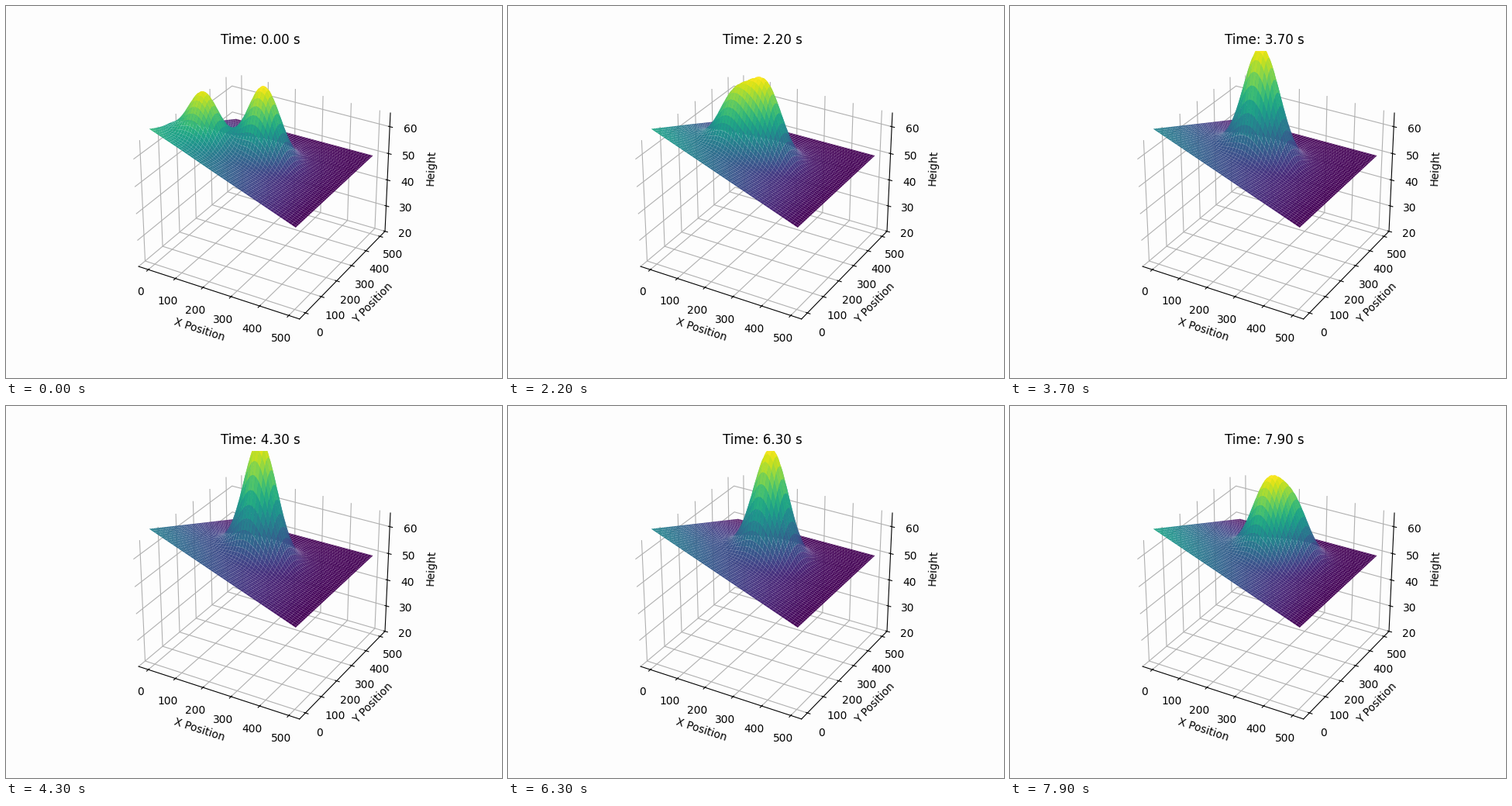
These frames come from a looping animation (640x480 px, 8 s). A matplotlib script:

```python
import numpy as np
import matplotlib.pyplot as plt
from matplotlib.animation import FuncAnimation

FRAMES, STEP = 80, 0.1

x = y = np.linspace(0, 500, 100)
X, Y = np.meshgrid(x, y)


def hill(cx, cy, height, sigma):
    return height * np.exp(-((X - cx) ** 2 + (Y - cy) ** 2) / (2 * sigma ** 2))


BASE = 50 + 20 * (1 - X / 500) * (1 - Y / 500)
GROUND = BASE + hill(250, 250, 25, 50)


def center(t):
    """Position of the travelling hill."""
    return 100 + 30.4 * t - 0.644 * t ** 2, 150 + 26.5 * t - 0.56 * t ** 2


fig = plt.figure(figsize=(6.4, 4.8), dpi=100, facecolor="#fdfdfd")
ax = fig.add_subplot(projection="3d", facecolor="#fdfdfd")
for axis in (ax.xaxis, ax.yaxis, ax.zaxis):
    axis.set_pane_color("#fdfdfd")
surface = None


def update(i):
    global surface
    t = i * STEP
    if surface is not None:
        surface.remove()
    Z = GROUND + hill(*center(t), 17.5, 47)
    surface = ax.plot_surface(X, Y, Z, cmap="viridis")
    ax.set_zlim(20, 65)
    ax.set_title(f"Time: {t:.2f} s")
    return []


ax.set_xlabel("X Position")
ax.set_ylabel("Y Position")
ax.set_zlabel("Height")

anim = FuncAnimation(fig, update, frames=FRAMES, init_func=lambda: [],
                     interval=1000 * STEP, repeat=True, repeat_delay=0)
plt.show()
```
